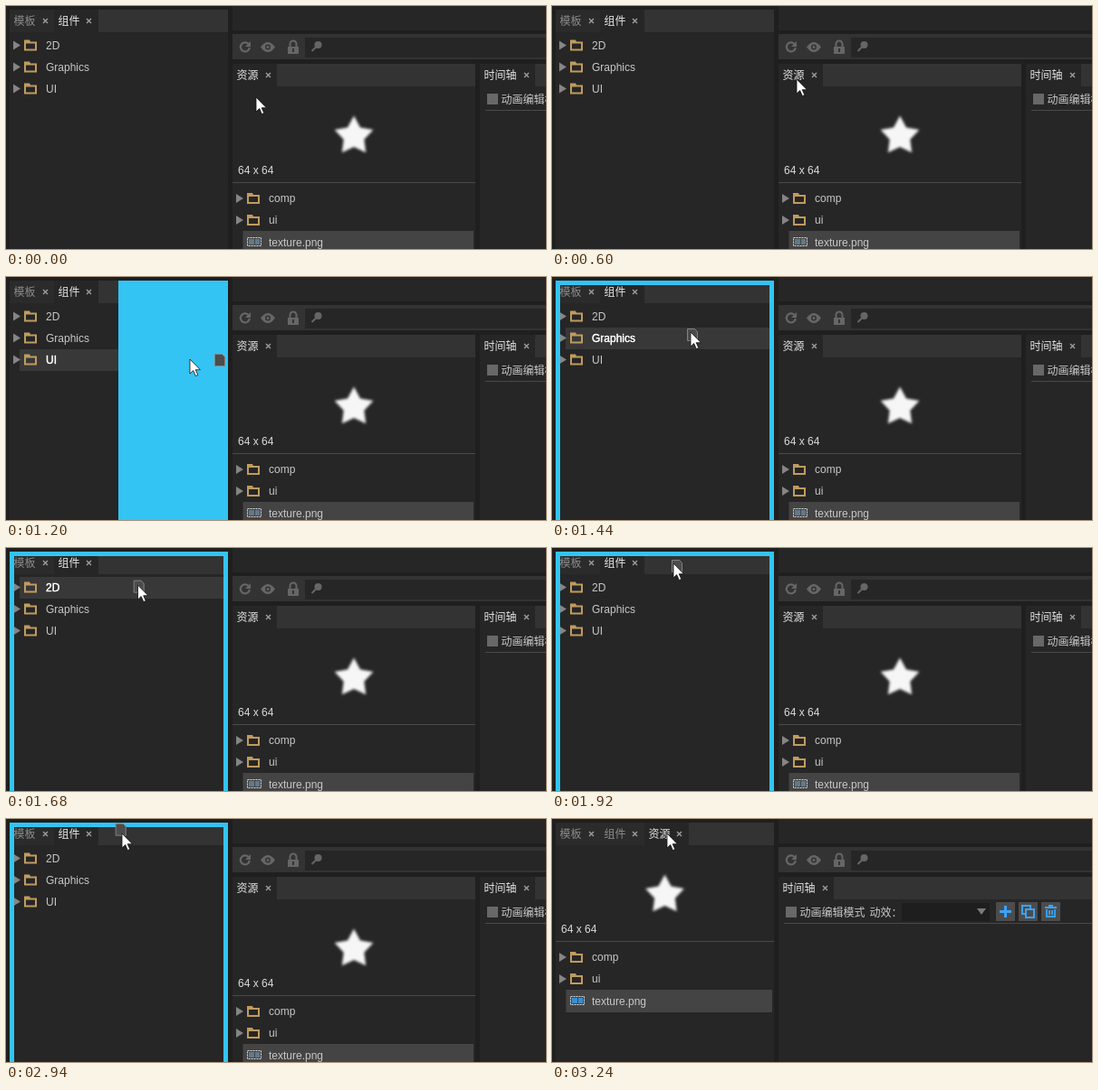
An HTML page that plays this animation: 596 by 269 pixels, repeating every 4440 ms.

```html
<!DOCTYPE html>
<html lang="zh-CN">
<head>
<meta charset="utf-8">
<title>Docking a panel</title>
<style>
html, body { margin: 0; width: 100%; height: 100%; overflow: hidden; background: #1f1f1f; }
svg { display: block; width: 596px; height: 269px; }
text { font: 12px "Liberation Sans", Arial, "Noto Sans CJK SC", "Noto Sans CJK", sans-serif; fill: #c8c8c8; white-space: pre; }
</style>
</head>
<body>
<svg id="stage" viewBox="0 0 596 269" xmlns="http://www.w3.org/2000/svg"></svg>
<script>
const LOOP = 4440, STEP = 60, DRAG = 1020, DROP = 3180;
const BLUE = '#33c4f3', PANEL = '#262626', STRIP = '#333';
const stage = document.getElementById('stage');

const rect = (x, y, w, h, fill, extra = '') =>
  `<rect x="${x}" y="${y}" width="${w}" height="${h}" fill="${fill}" ${extra}/>`;
const path = (d, fill, extra = '') => `<path d="${d}" fill="${fill}" ${extra}/>`;
const line = (d, color, width = 1) => path(d, 'none', `stroke="${color}" stroke-width="${width}"`);
const text = (x, y, s, color = '#c8c8c8') => `<text x="${x}" y="${y}" style="fill:${color}">${s}</text>`;
const group = (id, body, extra = '') => `<g id="${id}" ${extra}>${body}</g>`;

const folder = (x, y) =>
  path(`M${x} ${y}h6l1 2h7v10h-14zM${x + 2} ${y + 4}v6h10v-6z`, '#c09b5f', 'fill-rule="evenodd"');

function row(x, y, name) {
  return path(`M${x} ${y - 5}l8 5l-8 5z`, '#858585') + folder(x + 12, y - 6) + text(x + 36, y + 4, name);
}

// Tab strip with the last-named tab drawn active.
function panel(x, y, w, names) {
  let body = rect(x, y, w, 300, PANEL) + rect(x, y, w, 25, STRIP), left = x;
  names.forEach((name, i) => {
    const active = i === names.length - 1;
    const width = name.length * 12 + 25;
    const cx = left + name.length * 12 + (i ? 14.5 : 15.5), cy = y + 12.5;
    body += rect(left, y, width, 25, active ? PANEL : '#2b2b2b')
      + text(left + 4.5, y + 17, name, active ? '#e6e6e6' : '#8c8c8c')
      + line(`M${cx - 2.5} ${cy - 2.5}l5 5m0 -5l-5 5`, '#a0a0a0', 1.3);
    left += width;
  });
  return body;
}

function star(cx, cy, r) {
  const points = Array.from({ length: 10 }, (_, i) => {
    const a = i * Math.PI / 5 - Math.PI / 2, k = i % 2 ? r * 0.53 : r;
    return `${(cx + k * Math.cos(a)).toFixed(1)},${(cy + k * Math.sin(a)).toFixed(1)}`;
  });
  return `<polygon points="${points.join(' ')}" fill="#f6f6f6" filter="url(#soft)"/>`;
}

function textureIcon(x, y, color) {
  return rect(x + 2, y + 2, 6, 6, color) + rect(x + 9, y + 2, 5, 6, color)
    + rect(x + .5, y + .5, 15, 9, 'none', 'stroke="#d8dce0" stroke-dasharray="2 1"');
}

function assets(x, y, w, tabs, iconColor) {
  const top = y - 64;
  return panel(x, y, w, tabs)
    + star(x + w / 2, top + 144, 22.5)
    + text(x + 6, top + 186, '64 x 64', '#dcdcdc')
    + rect(x, top + 195, w, 1, '#4a4a4a')
    + row(x + 4, top + 213, 'comp') + row(x + 4, top + 237, 'ui')
    + rect(x + 11.5, top + 249, w - 13.5, 25, '#444')
    + textureIcon(x + 16, top + 256, iconColor)
    + text(x + 40, top + 266, 'texture.png');
}

function timeline(x) {
  const button = (left, icon) => rect(x + left, 92, 21, 21, '#4c4c4c')
    + `<g transform="translate(${x + left} 92)">${icon}</g>`;
  const ink = '#3da2f6';
  return panel(x, 64, 346, ['时间轴'])
    + rect(x + 8, 97, 12, 12, '#686868')
    + text(x + 23.5, 108, '动画编辑模式') + text(x + 100.5, 108, '动效：')
    + rect(x + 136, 93, 97, 20, '#1e1e1e')
    + path(`M${x + 219} 99h10l-5 7z`, '#7a7a7a')
    + button(240, rect(4, 9, 13, 3, ink) + rect(9, 4, 3, 13, ink))
    + button(265, line('M13 8V4H4v9h4', ink, 2) + rect(8, 8, 9, 9, 'none', `stroke="${ink}" stroke-width="2"`))
    + button(290, line('M4 6h13M8 4h5M6 8v8h9v-8M9 9v5M12 9v5', ink, 1.8))
    + rect(x + 6, 115, 340, 1, '#4a4a4a');
}

function toolbar() {
  const gray = '#666';
  return rect(250, 0, 346, 27, PANEL) + rect(250, 31, 346, 28, STRIP)
    + rect(330, 35, 266, 22, PANEL)
    + line('M267.5 42a5 5 0 1 0 1.3 4', gray, 2.2) + path('M264 45h6v-6z', gray)
    + path('M281 45.5q8 -11 16 0q-8 11 -16 0z', gray)
    + '<circle cx="289" cy="45.5" r="3" fill="#333"/><circle cx="289" cy="45.5" r="1.5" fill="#666"/>'
    + line('M313.5 45v-3a3.5 3.5 0 0 1 7 0v3', gray, 2) + rect(311, 45, 12, 8, gray)
    + rect(316, 47, 2, 4, STRIP)
    + '<circle cx="344.5" cy="43" r="4" fill="#666"/>' + line('M342 45.5l-4.5 4.5', gray, 2);
}

const rowNames = ['2D', 'Graphics', 'UI'];
const components = panel(4, 4, 241, ['模板', '组件'])
  + group('hover', rect(15, 0, 230, 24, '#383838'))
  + rowNames.map((name, i) => row(8, 43.5 + 24 * i, name)).join('')
  + group('hoverName', text(44, 0, ''));

stage.innerHTML = `<defs><filter id="soft" x="-20%" y="-20%" width="140%" height="140%">
  <feGaussianBlur stdDeviation="1.6"/></filter></defs>`
  + rect(0, 0, 596, 269, '#1f1f1f') + toolbar()
  + group('before', components + assets(250, 64, 268, ['资源'], '#63798a') + timeline(523))
  + group('after', assets(4, 4, 241, ['模板', '组件', '资源'], '#3b8fcd') + timeline(250))
  + group('midFrame', rect(252.5, 66.5, 263, 230, 'none', `stroke="${BLUE}" stroke-width="5"`))
  + group('leftFrame', rect(6.5, 6.5, 236, 300, 'none', `stroke="${BLUE}" stroke-width="5"`))
  + group('half', rect(124, 4, 121, 265, BLUE))
  + group('page', path('M.5 .5h8l3 3v10h-11z', '#4c4c4c', 'stroke="#858080"'))
  + group('cursor', path('M0 0V16L3.7 12.6L6.3 18.6L8.8 17.5L6.2 11.7H11.4Z', '#fff',
      'stroke="#111" stroke-width=".8"'));

const parts = Object.fromEntries([...stage.querySelectorAll('g[id]')].map(g => [g.id, g]));
const hoverText = parts.hoverName.firstChild;
hoverText.setAttribute('stroke', '#fff');
hoverText.setAttribute('stroke-width', '.3');
hoverText.style.fill = '#fff';

// Pointer tip: time, x, y
const route = [
  [0, 276, 101], [180, 270, 82], [540, 270, 82], [600, 270, 81], [780, 268, 76], [960, 268, 76],
  [1080, 256, 88], [1140, 237, 96], [1200, 203, 91], [1260, 180, 84], [1380, 156, 68],
  [1440, 153, 61], [1500, 152, 58], [1860, 139, 24], [1920, 134, 17], [2040, 127, 14],
  [2580, 127, 14], [2640, 127, 15], [2760, 127, 15], [2940, 128, 16], [3120, 128, 16],
  [3180, 127, 16], [LOOP, 127, 16]
];

function tipAt(t) {
  const i = Math.max(1, route.findIndex(p => p[0] >= t));
  const [t0, x0, y0] = route[i - 1], [t1, x1, y1] = route[i];
  const k = (t - t0) / (t1 - t0);
  return [x0 + (x1 - x0) * k, y0 + (y1 - y0) * k];
}

const show = (name, on) => parts[name].setAttribute('display', on ? 'inline' : 'none');
const move = (name, x, y) => parts[name].setAttribute('transform', `translate(${x.toFixed(2)} ${y.toFixed(2)})`);

function draw(ms) {
  const t = Math.floor((ms % LOOP) / STEP) * STEP;
  const [x, y] = tipAt(t);
  const dragging = t >= DRAG && t < DROP;
  const overLeft = x < 245;
  const nearEdge = overLeft && x > 185;
  const hovered = Math.floor((y - 32) / 24);
  const hovering = dragging && overLeft && hovered >= 0 && hovered < rowNames.length;

  show('before', t < DROP);
  show('after', t >= DROP);
  show('midFrame', dragging && !overLeft);
  show('leftFrame', dragging && overLeft && !nearEdge);
  show('half', dragging && nearEdge);
  show('page', dragging);
  show('hover', hovering);
  show('hoverName', hovering);
  if (hovering) {
    move('hover', 0, 32 + 24 * hovered);
    move('hoverName', 0, 47.5 + 24 * hovered);
    hoverText.textContent = rowNames[hovered];
  }
  // The dragged page trails the pointer by one step.
  const [px, py] = tipAt(Math.max(0, t - STEP));
  move('page', px - 7, py - 11);
  move('cursor', x, y);
}

const start = performance.now();
function tick() {
  draw(performance.now() - start);
  requestAnimationFrame(tick);
}
draw(0);
requestAnimationFrame(tick);
</script>
</body>
</html>
```
